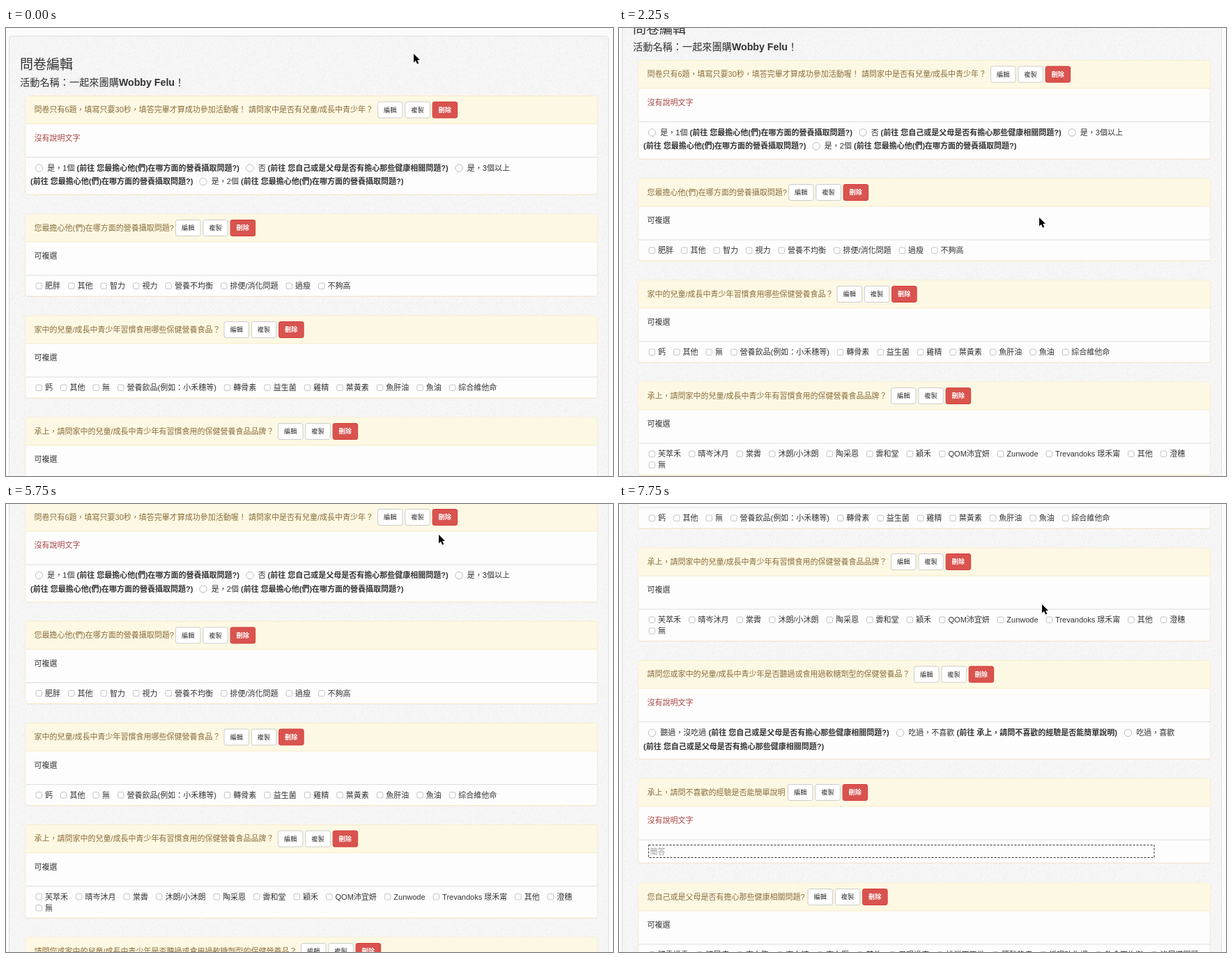
An HTML page that plays this animation: 871x643 px, repeating every 8 s.

```html
<!DOCTYPE html>
<html lang="zh-Hant">
<head>
<meta charset="utf-8">
<title>問卷編輯</title>
<style>
html, body { margin: 0; width: 100%; height: 100%; overflow: hidden; background: #fcfcfc; }
svg { display: block; width: 871px; height: 643px; }
text { font: 11px "Liberation Sans", "Noto Sans CJK TC", "Noto Sans CJK HK", "Noto Sans CJK", "Noto Sans CJK JP", sans-serif; fill: #333; white-space: pre; }
text.b { font-weight: bold; }
text.h1 { font-size: 19px; }
text.h2 { font-size: 14.2px; }
text.ask { fill: #8a6d3b; }
text.none { fill: #a94442; }
text.hint { fill: #999; }
text.btn { font-size: 9.2px; text-anchor: middle; }
text.del { fill: #fff; font-weight: bold; }
</style>
</head>
<body>
<svg viewBox="0 0 871 643">
  <defs><pattern id="grain" width="64" height="64" patternUnits="userSpaceOnUse"></pattern></defs>
  <g id="page"></g>
  <path id="cursor" d="M0 0V12.4L2.9 9.8 5 14.6 7.2 13.7 5.2 9H9Z" stroke="#fff" stroke-width="1" paint-order="stroke"/>
</svg>
<script>
const NS = 'http://www.w3.org/2000/svg';
const page = document.getElementById('page');
const cursor = document.getElementById('cursor');
const pen = document.createElement('canvas').getContext('2d');
pen.font = '11px "Liberation Sans", "Noto Sans CJK TC", "Noto Sans CJK HK", "Noto Sans CJK", "Noto Sans CJK JP", sans-serif';

function add(tag, attrs, parent = page) {
  const el = document.createElementNS(NS, tag);
  for (const k in attrs) el.setAttribute(k, attrs[k]);
  parent.appendChild(el);
  return el;
}
const rect = (x, y, width, height, fill, more) => add('rect', { x, y, width, height, fill, ...more });
function text(x, y, str, cls = '') {
  const el = add('text', { x, y, class: cls });
  el.textContent = str;
  return el;
}

// Paper grain: a seeded tile of faint dots
function grain() {
  const tile = document.getElementById('grain');
  let seed = 7;
  const rnd = n => (seed = seed * 16807 % 2147483647) % n;
  const dots = n => {
    let d = '';
    for (let i = 0; i < n; i++) d += `M${rnd(64)} ${rnd(64)}h1v1h-1z`;
    return d;
  };
  add('rect', { width: 64, height: 64, fill: '#f5f5f5' }, tile);
  add('path', { d: dots(1100), fill: '#f0f0f0' }, tile);
  add('path', { d: dots(900), fill: '#f9f9f9' }, tile);
}

function button(x, y, label, red) {
  rect(x + .5, y + .5, 35.5, 23, red ? '#d9534f' : '#fff',
    { rx: 2.5, stroke: red ? '#d43f3a' : '#ccc' });
  text(x + 18.2, y + 15.4, label, red ? 'btn del' : 'btn');
}

function card(top, height, title, btnX, note) {
  rect(28, top + 1, 820.5, height, '#000', { rx: 3, opacity: .06 });
  rect(28, top, 820.5, height, '#fdfdfd', { rx: 3, stroke: '#faebcc' });
  rect(28.5, top + .5, 819.5, 39.5, '#fcf8e3', { rx: 2 });
  rect(28, top + 39.5, 820.5, 1, '#faebcc');
  rect(28.5, top + 87.5, 819.5, 1, '#ddd');
  text(40.5, top + 23.7, title, 'ask');
  button(btnX, top + 8, '編輯');
  button(btnX + 39.3, top + 8, '複製');
  button(btnX + 78.6, top + 8, '刪除', true);
  text(40.5, top + 64.2, note ? '可複選' : '沒有說明文字', note ? '' : 'none');
}

function checks(y, labels) {
  let x = 56;
  for (const label of labels.split('|')) {
    rect(x - 13, y - 4, 8.5, 8.5, '#fff', { rx: 2, stroke: '#bbb', 'stroke-width': .9 });
    text(x, y + 4, label);
    x += pen.measureText(label).width + 24.5;
  }
}

function radio(x, y, label, boldX, go) {
  add('circle', { cx: x, cy: y + .5, r: 5.2, fill: '#fff', stroke: '#b5b5b5', 'stroke-width': .9 });
  text(x + 11.8, y + 4, label);
  if (go) text(boldX, y + 4, go, 'b');
}

const WORRY = '您最擔心他(們)在哪方面的營養攝取問題?';
const SELF = '您自己或是父母是否有擔心那些健康相關問題?';
const WHY = '承上，請問不喜歡的經驗是否能簡單說明';
const go = s => `(前往 ${s})`;

function build() {
  grain();
  rect(4.5, 11.5, 860, 1500, 'url(#grain)', { rx: 4, stroke: '#dfdfdf' });
  text(20, 59, '問卷編輯', 'h1');
  const sub = text(20, 82.6, '活動名稱：一起來團購', 'h2');
  const name = add('tspan', { 'font-weight': 'bold' }, sub);
  name.textContent = 'Wobby Felu';
  add('tspan', {}, sub).textContent = '！';

  card(97.5, 141.5, '問卷只有6題，填寫只要30秒，填答完畢才算成功參加活動喔！ 請問家中是否有兒童/成長中青少年？', 533, false);
  radio(47.5, 200.5, '是，1個', 101.5, go(WORRY));
  radio(350, 200.5, '否', 375.5, go(SELF));
  radio(650, 200.5, '是，3個以上');
  text(35, 224, go(WORRY), 'b');
  radio(283, 220, '是，2個', 337, go(WORRY));

  card(267, 118, WORRY, 243, true);
  checks(370, '肥胖|其他|智力|視力|營養不均衡|排便/消化問題|過瘦|不夠高');

  card(413, 118, '家中的兒童/成長中青少年習慣食用哪些保健營養食品？', 312.5, true);
  checks(516, '鈣|其他|無|營養飲品(例如：小禾穗等)|轉骨素|益生菌|雞精|葉黃素|魚肝油|魚油|綜合維他命');

  card(559, 133.5, '承上，請問家中的兒童/成長中青少年有習慣食用的保健營養食品品牌？', 390, true);
  checks(662, '芙萃禾|晴岑沐月|棠霽|沐朗/小沐朗|陶采恩|霽和堂|穎禾|QOM沛宜妍|Zunwode|Trevandoks 璟禾甯|其他|澄穗');
  checks(678, '無');

  card(720.5, 141.5, '請問您或家中的兒童/成長中青少年是否聽過或食用過軟糖劑型的保健營養品？', 423, false);
  radio(47.5, 824, '聽過，沒吃過', 128.5, go(SELF));
  radio(403.5, 824, '吃過，不喜歡', 484.5, go(WHY));
  radio(730.5, 824, '吃過，喜歡');
  text(35, 847.5, go(SELF), 'b');

  card(890, 121, WHY, 242, false);
  rect(42.5, 985.5, 725.5, 18, '#fdfdfd', { stroke: '#333', 'stroke-dasharray': '3 2' });
  text(44.5, 999, '簡答', 'hint');

  card(1040, 134, SELF, 270.5, true);
  checks(1142.5, '體重過重|糖尿病|高血脂|高血糖|高血壓|其他|用眼過度|排泄不正常|腰酸背痛|循環功失調|飲食不均衡|泌尿道問題');
}

const STEP = 250, LOOP = 8000;
const scrollRuns = [
  [0, [0]],
  [1250, [46, 49, 50]],
  [2250, [51, 60, 72, 84, 98.5]],
  [6500, [200, 322, 385, 445, 485, 496]]
];
const cursorRuns = [
  [0, [[585, 37], [604, 105], [625, 205], [603, 272]]],
  [4000, [[596, 215], [566, 120], [546, 40], [556, 8], [585, 26]]],
  [5250, [[600, 30], [613, 36], [621, 44], [616, 100], [607, 144]]]
];

function valueAt(runs, t) {
  const [start, vals] = runs.filter(r => r[0] <= t).pop();
  return vals[Math.min(vals.length - 1, Math.floor((t - start) / STEP))];
}

function draw(now) {
  const t = now % LOOP;
  const [x, y] = valueAt(cursorRuns, t);
  page.setAttribute('transform', `translate(0 ${-valueAt(scrollRuns, t)})`);
  cursor.setAttribute('transform', `translate(${x} ${y})`);
}

build();
const begin = performance.now();
function tick() {
  draw(performance.now() - begin);
  requestAnimationFrame(tick);
}
tick();
</script>
</body>
</html>
```
